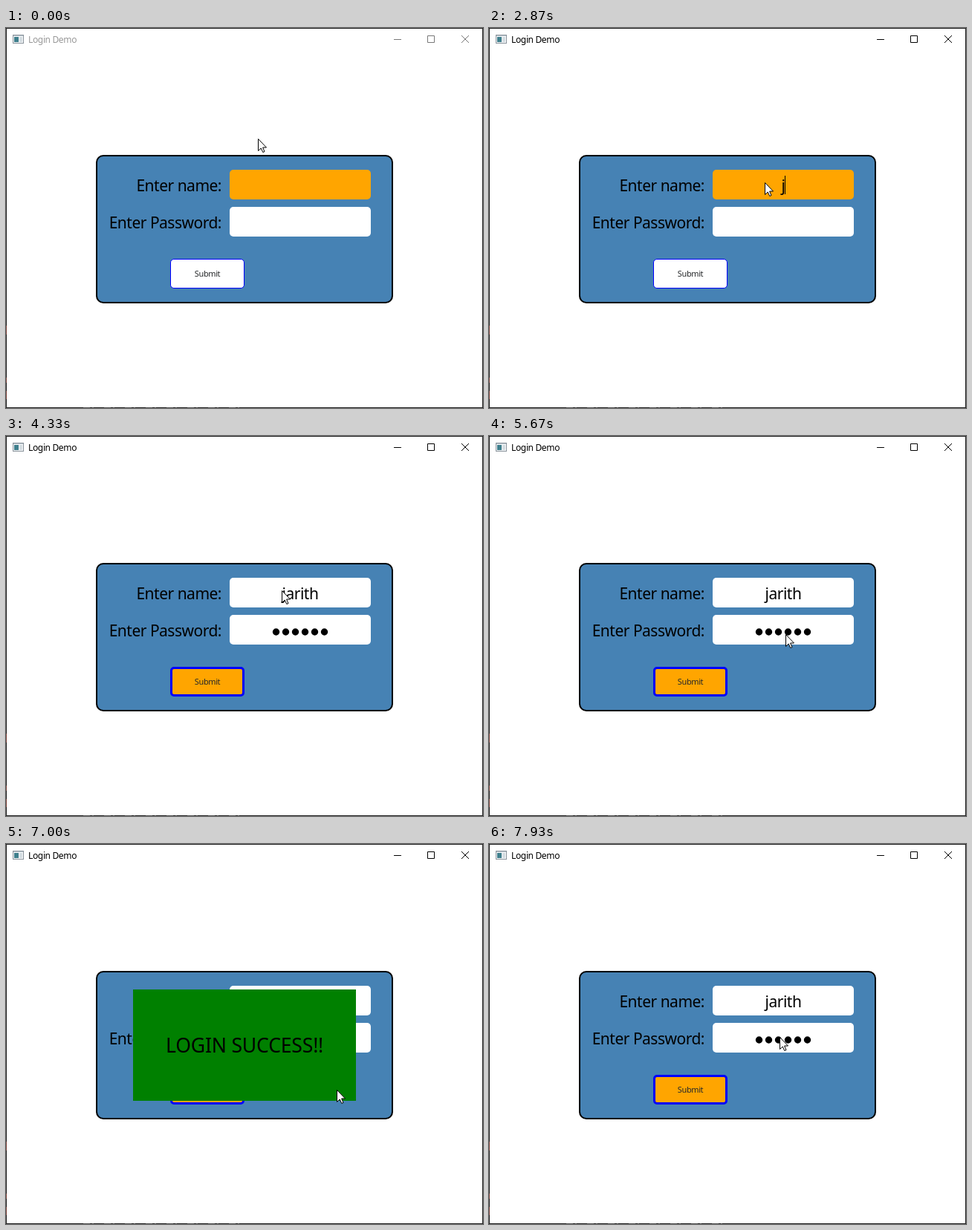
These frames come from a looping animation (642x512 px, 8 s). An HTML page:

```html
<!DOCTYPE html>
<html lang="en">
<head>
<meta charset="utf-8">
<title>Login Demo</title>
<style>
html, body { margin: 0; width: 100%; height: 100%; overflow: hidden; background: #fff; }
svg { display: block; width: 642px; height: 512px; }
text { font: 21px "Noto Sans", sans-serif; letter-spacing: -.5px; }
.end { text-anchor: end; }
.mid { text-anchor: middle; }
#title { font-size: 12px; letter-spacing: -.35px; fill: #999; }
#buttons { fill: none; stroke: #777; }
.active #title { fill: #000; }
.active #buttons { stroke: #000; }
#submit text { font-size: 11px; letter-spacing: -.4px; fill: #26282a; }
#popup text { font-size: 26.6px; letter-spacing: -.2px; }
</style>
</head>
<body>
<svg id="window" viewBox="0 0 642 512">
  <rect x=".5" y=".5" width="641" height="511" fill="#fff" stroke="#222"/>
  <!-- slivers of the desktop behind the window -->
  <path d="M.5 401v12M.5 471v7M.5 489v11" stroke="#7a4038"/>
  <path d="M104 511.5H318" stroke="#555" stroke-dasharray="9 3 2 14"/>

  <g id="icon">
    <rect x="9.5" y="9.5" width="14" height="11" fill="#f4f6f8" stroke="#8a939b"/>
    <path d="M10 10h13v1H10z" fill="#b9c4cd"/>
    <path d="M11 12h6v7h-6z" fill="#3f7f8c"/>
    <path d="M18 12h4v7h-4z" fill="#d5dde2"/>
  </g>
  <text id="title" x="30" y="20">Login Demo</text>
  <path id="buttons" d="M522 15.5h10M567.5 10.5h9v9h-9zM613 10l10 10M623 10l-10 10"/>

  <rect x="122" y="172" width="398" height="198" rx="9" fill="#4682b4" stroke="#000" stroke-width="2"/>
  <text class="end" x="290" y="220">Enter name:</text>
  <text class="end" x="290" y="270">Enter Password:</text>
  <rect id="nameField" x="301" y="191" width="190" height="40" rx="5"/>
  <rect id="passField" x="301" y="241" width="190" height="40" rx="5"/>
  <text id="name" class="mid" x="396" y="220"></text>
  <path id="dots" fill="none" stroke="#000" stroke-width="9.4" stroke-linecap="round"/>
  <rect id="caret" width="1" height="25"/>

  <g id="submit">
    <rect id="submitBox" stroke="#00f"/>
    <text class="mid" x="271" y="335">Submit</text>
  </g>

  <g id="popup">
    <rect x="171" y="196" width="300" height="150" fill="#008000"/>
    <text class="mid" x="321" y="281">LOGIN SUCCESS!!</text>
  </g>
  <path id="cursor" d="M.5 .5V16.5L4.2 13 6.8 18.5 9 17.5 6.6 12H11.5Z" fill="#fff" stroke="#000"/>
</svg>
<script>
const $ = id => document.getElementById(id);
const set = (id, attrs) => {
  for (const key in attrs) $(id).setAttribute(key, attrs[key]);
};

// All times are ticks of 1/15 second.
const TICK = 1000 / 15, LOOP = 8000, CENTER = 396;
const USER = "jarith";
const ACTIVATE = 32, CARET_OFF = 40, TYPE_NAME = 43, TO_PASSWORD = 52;
const TYPE_PASSWORD = 55, TO_SUBMIT = 65, POPUP_ON = 95, POPUP_OFF = 111;

// Each stroke bends from the previous resting place past `via` to `end`.
const mouseStart = [339, 149];
const strokes = [
  { from: 0, to: 7, via: [334, 163], end: [347, 192] },
  { from: 27, to: 31, via: [360, 196], end: [371, 208] },
  { from: 83, to: 86, via: [398, 240], end: [408, 309] },
  { from: 87, to: 93, via: [370, 348], end: [286, 330] },
  { from: 97, to: 110, via: [464, 345], end: [484, 314] },
  { from: 113, to: 119, via: [450, 290], end: [391, 260] }
];

function mouseAt(tick) {
  let pos = mouseStart;
  for (const { from, to, via, end } of strokes) {
    if (tick < from) break;
    const k = Math.min(1, (tick - from) / (to - from));
    pos = pos.map((p, i) =>
      Math.round((1 - k) ** 2 * p + 2 * k * (1 - k) * via[i] + k * k * end[i]));
  }
  return pos;
}

// Three keystrokes every four ticks.
const typed = (tick, start) =>
  Math.max(0, Math.min(USER.length, 1 + Math.floor((tick - start) * 0.75)));

function draw(tick) {
  const fill = focused => focused ? "#ffa500" : "#fff";
  const show = visible => visible ? "visible" : "hidden";
  const inSubmit = tick >= TO_SUBMIT;
  const inPassword = tick >= TO_PASSWORD && !inSubmit;

  $("window").classList.toggle("active", tick >= ACTIVATE);
  set("nameField", { fill: fill(tick < TO_PASSWORD) });
  set("passField", { fill: fill(inPassword) });

  const border = inSubmit ? 3 : 1;
  set("submitBox", {
    x: 221 + border / 2, y: 311 + border / 2,
    width: 100 - border, height: 40 - border, rx: 5 - border / 2,
    fill: fill(inSubmit), "stroke-width": border
  });

  const letters = typed(tick, TYPE_NAME), count = typed(tick, TYPE_PASSWORD);
  $("name").textContent = USER.slice(0, letters);
  let d = "";
  for (let i = 0; i < count; i++) d += `M${CENTER + 13 * (i - (count - 1) / 2)} 264h.01`;
  set("dots", { d });

  const nameWidth = letters ? $("name").getComputedTextLength() : 0;
  const typedWidth = inPassword ? count * 13 : nameWidth;
  const caretOn = tick >= ACTIVATE && !inSubmit && (tick < CARET_OFF || tick >= TYPE_NAME);
  set("caret", {
    x: Math.round(CENTER + typedWidth / 2), y: inPassword ? 249 : 199,
    visibility: show(caretOn)
  });

  set("popup", { visibility: show(tick >= POPUP_ON && tick < POPUP_OFF) });
  set("cursor", { transform: `translate(${mouseAt(tick)})` });
}

const start = performance.now();
function frame() {
  const time = (performance.now() - start) % LOOP;
  draw(Math.floor((time + 4) / TICK));
  requestAnimationFrame(frame);
}
frame();
</script>
</body>
</html>
```
